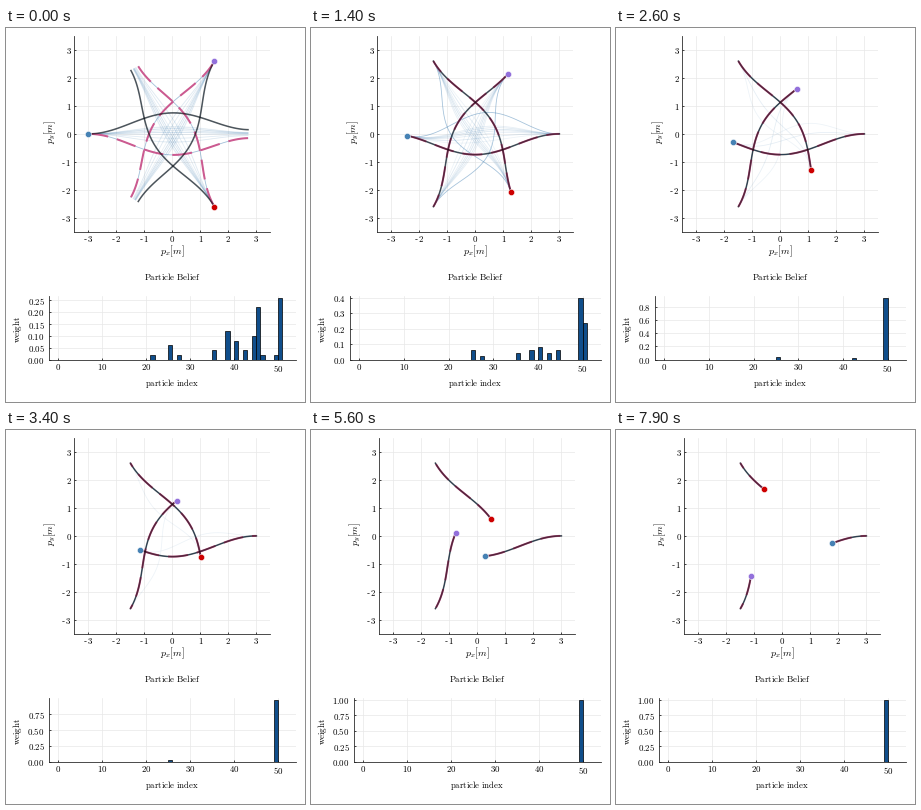
These frames come from a looping animation (299 by 374 pixels, 8 s). A matplotlib script:

```python
import numpy as np
import matplotlib.pyplot as plt
from matplotlib.animation import FuncAnimation

W, H = 299, 374
FRAMES, STEP = 80, 100
PX = 0.72  # points per pixel at 100 dpi

plt.rcParams.update({
    "font.family": "Liberation Serif",
    "mathtext.fontset": "cm",
    "axes.linewidth": 0.8 * PX,
    "axes.axisbelow": True,
})

# Fading particles: index -> (share of TOTAL at the start, lifetime in s)
FADING = {21: (1, 0.6), 25: (3, 3.6), 27: (1, 1.9), 35: (2, 2.2),
          38: (6, 1.65), 40: (4, 2.5), 42: (2, 3.5), 44: (5, 1.8),
          45: (11, 0.65), 46: (1, 0.6), 50: (13, 2.5)}
TOTAL, WINNER = 50, 49
BEND = 0.74
AGENTS = [(0, "#4682b4"), (-120, "#9370db"), (120, "#cd0000")]


def rm(text):
    return rf"$\mathrm{{{text}}}$"


def signed(n):
    return rm(n) if n >= 0 else rf"-$\:\mathrm{{{-n}}}$"


def weights(t):
    """Fading particles lose their share, the winner collects the rest."""
    left = {k: round(n * max(0, 1 - (t / life) ** 4))
            for k, (n, life) in FADING.items()}
    left[WINNER] = TOTAL - sum(left.values())
    return {k: n / TOTAL for k, n in left.items()}


def bends():
    """Even particles pass above, odd ones below; light ones stay central."""
    rng = np.random.default_rng(4)
    size = {k: BEND if n > 10 else rng.uniform(0, 0.3)
            for k, (n, _) in FADING.items()}
    size[WINNER] = BEND
    return {k: s * (-1) ** k for k, s in size.items()}


def lane(x):
    return -BEND * np.cos(np.pi * x / 6) ** 2


def progress(t):
    """Position along the lane: speeds up, then cruises."""
    return -3 + 0.655 * (t - 0.59 * (1 - np.exp(-t / 0.59)))


def plan(amp, x0, end):
    x = np.linspace(x0, end, 90)
    s = (x - x0) / (3 - x0)
    lift = amp * 0.22 * (3 - end) / 0.3 * s ** 4
    return x, lane(x) + (amp + BEND) * np.sin(np.pi * s) ** 2 + lift


def rotate(x, y, deg):
    c, s = np.cos(np.radians(deg)), np.sin(np.radians(deg))
    return c * x - s * y, s * x + c * y


def place(ax, left, top, right, bottom):
    ax.set_position([left / W, 1 - bottom / H, (right - left) / W, (bottom - top) / H])


def style(ax, pad_x, pad_y):
    ax.grid(color="#e8e8e8", lw=0.7 * PX)
    ax.spines[["top", "right"]].set_visible(False)
    ax.spines[["left", "bottom"]].set_color("#222222")
    ax.tick_params(direction="in", length=2 * PX, width=0.7 * PX, labelsize=8.8 * PX)
    ax.tick_params(axis="x", pad=pad_x * PX)
    ax.tick_params(axis="y", pad=pad_y * PX)


def label(x, y, text, size=9, rot=0):
    return fig.text(x / W, 1 - y / H, text, fontsize=size * PX, rotation=rot,
                    ha="center", va="center")


fig = plt.figure(figsize=(2.99, 3.74), dpi=100, facecolor="white")
top, low = fig.add_axes([0, 0, 1, 1]), fig.add_axes([0, 0, 1, 0.5])
style(top, 2, 2.6)
style(low, 2.5, 4.2)

ticks = range(-3, 4)
names = [signed(n) for n in ticks]
top.set(xlim=(-3.5, 3.5), ylim=(-3.5, 3.5))
top.set_xticks(ticks, names)
top.set_yticks(ticks, names)
low.set_xlim(-2.05, 54.1)
low.set_xticks(range(0, 51, 10), [rm(n) for n in range(0, 51, 10)])

centred = [label(166, 223, "$p_x[m]$", 9.8),
           label(166, 248.5, rm(r"Particle\ Belief"), 8.8),
           label(166, 355, rm(r"particle\ index"), 8.8)]
py_label = label(44.5, 104, "$p_y[m]$", 9.8, 90)
w_label = label(11, 301, rm("weight"), 9, 90)

amps = bends()
thin, dashed, dark, dots = {}, [], [], []
for deg, color in AGENTS:
    for k in amps:
        thin[k, deg], = top.plot([], [], color="#4682b4", lw=0.8 * PX, zorder=2)
    dashed += top.plot([], [], color="#cc5a90", lw=2 * PX, zorder=3,
                       ls=(0, (10, 4.5)), dash_capstyle="butt")
    dark += top.plot([], [], color="black", alpha=0.58, lw=1.6 * PX, zorder=4)
    dots += top.plot([], [], "o", color=color, ms=6.2 * PX, mec="white",
                     mew=0.5 * PX, zorder=5, clip_on=False)

low.plot([1, 51], [0, 0], color="black", lw=0.7 * PX)
bars = dict(zip(amps, low.bar(list(amps), [0] * len(amps), 1, align="edge",
                              color="#104e8b", ec="black", lw=0.7 * PX)))


def layout(peak):
    wide = peak < 0.29 or peak > 0.95
    if wide:
        step, digits = (0.05 if peak < 0.29 else 0.25), 2
    else:
        step, digits = (0.1 if peak < 0.55 else 0.2), 1
    shift = 0 if wide else -2
    place(top, 68.4 + shift, 7.9, 264.4 + shift, 203.9)
    place(low, 43 + 2 * shift, 268, 290, 332)
    for text in centred:
        text.set_x((166 + shift) / W)
    py_label.set_x((44.5 + shift) / W)
    w_label.set_x((11 - shift / 2) / W)
    unit = peak / 61.5
    low.set_ylim(-0.5 * unit, 63.5 * unit)
    marks = np.arange(0, peak + 1e-6, step)
    low.set_yticks(marks, [rm(f"{m:.{digits}f}") for m in marks])


def draw(i):
    t = i * STEP / 1000
    w = weights(t)
    best = max(w, key=w.get)
    layout(w[best])
    for k, bar in bars.items():
        bar.set_height(w[k])
        bar.set_visible(w[k] > 0)

    x0, end = progress(t), min(3, 2.7 + 0.06 * i)
    paths = {k: plan(amp, x0, end) for k, amp in amps.items()}
    for n, (deg, _) in enumerate(AGENTS):
        for k, path in paths.items():
            line = thin[k, deg]
            line.set_data(*rotate(*path, deg))
            line.set_visible(w[k] > 0)
            line.set_alpha(min(1, 0.06 + 1.8 * w[k]))
        dashed[n].set_data(*rotate(*paths[WINNER], deg))
        dark[n].set_data(*rotate(*paths[best], deg))
        x, y = rotate(x0, lane(x0), deg)
        dots[n].set_data([x], [y])
    return []


anim = FuncAnimation(fig, draw, frames=FRAMES, interval=STEP,
                     init_func=lambda: draw(0), repeat=True, repeat_delay=0)
plt.show()
```
